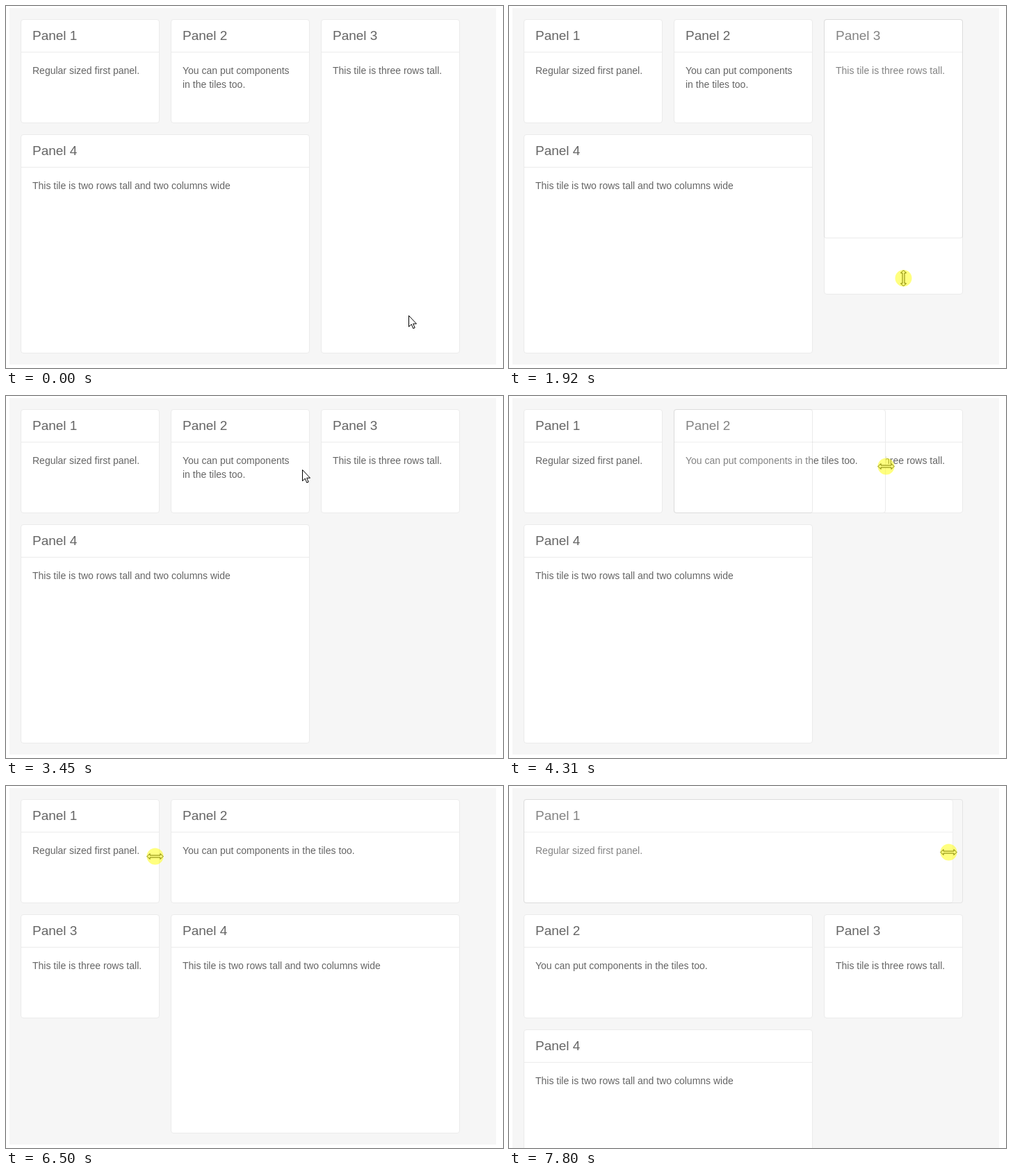
These frames come from a looping animation (715x522 px, 8000 ms). An HTML page:

```html
<!DOCTYPE html>
<html lang="en">
<head>
<meta charset="utf-8">
<title>Resizable tiles</title>
<style>
  html, body { margin: 0; width: 100%; height: 100%; overflow: hidden; background: #fff; }
  body { position: relative; font: 14px/20px "Liberation Sans", Arial, sans-serif; color: #656565; }
  * { box-sizing: border-box; }
  #grid {
    position: absolute; left: 5px; top: 3px; width: 700px; padding: 16px; background: #f6f6f6;
    display: grid; grid-template-columns: repeat(3, 200px); grid-auto-rows: 150px; gap: 16px;
  }
  .cell { position: relative; }
  .tile {
    position: absolute; left: 0; top: 0; width: 100%; height: 100%;
    background: #fff; border: 1px solid #ebebeb; border-radius: 4px; overflow: hidden;
  }
  .tile h2 {
    margin: 0; height: 47px; padding: 0 16px; border-bottom: 1px solid #ebebeb;
    font-size: 19px; font-weight: 400; line-height: 46px; white-space: nowrap;
  }
  .tile p { margin: 16px; }
  .drag { z-index: 1; }
  .drag::after {
    content: ""; position: absolute; inset: 0; border-radius: 4px;
    background: rgba(255, 255, 255, .2); border: 1px solid rgba(0, 0, 0, .08);
  }
  svg { position: absolute; left: 0; top: 0; z-index: 2; }
</style>
</head>
<body>
<div id="grid"></div>
<svg width="715" height="522">
  <g id="cursor">
    <path id="shape" fill="#fff" stroke="#000"/>
    <circle id="glow" cx=".5" cy=".5" r="12" fill="#ff0" fill-opacity=".5"/>
  </g>
</svg>
<script>
const LOOP = 8000;
const ARROW = 'M.5 .5V16.5L4.3 13 6.8 19 9.2 18 6.7 12.2H11.5Z';
const RESIZE = 'M-11.5 0L-7.5-4V-1.5H7.5V-4L11.5 0 7.5 4V1.5H-7.5V4Z';
const TEXTS = [
  'Regular sized first panel.',
  'You can put components in the tiles too.',
  'This tile is three rows tall.',
  'This tile is two rows tall and two columns wide'
];

// first change, last change, steps, cursor (capital = pressed), x, y, dragged edge, dragged panel
const MOVES = [
  [0, 0, 1, 'a', 579, 446],
  [150, 610, 7, 'a', 571, 502],
  [920, 920, 1, 'a', 572, 499],
  [1220, 1380, 3, 'v', 568, 497],
  [1610, 1610, 1, 'V', 568, 496, 501],
  [1690, 1920, 4, 'V', 567, 392, 416, 3],
  [1997, 2380, 6, 'V', 567, 156, 183, 3],
  [2450, 2530, 2, 'V', 567, 163, 167, 3],
  [2760, 2760, 1, 'v', 567, 163],
  [3140, 3370, 4, 'a', 418, 103],
  [3450, 3450, 1, 'a', 426, 106],
  [3620, 3770, 3, 'h', 435, 103],
  [4080, 4080, 1, 'H', 435, 103, 437],
  [4156, 4610, 7, 'H', 685, 98, 683, 2],
  [5010, 5010, 1, 'H', 673, 96, 673, 2],
  [5086, 5160, 2, 'H', 660, 97, 661, 2],
  [5330, 5330, 1, 'h', 660, 97],
  [5480, 6022, 8, 'a', 218, 108],
  [6100, 6100, 1, 'h', 214, 101],
  [6500, 6500, 1, 'H', 214, 101, 221],
  [6577, 6960, 6, 'H', 425, 98, 424, 1],
  [7037, 7190, 3, 'H', 447, 97, 446, 1],
  [7420, 7800, 6, 'H', 632, 95, 639, 1]
];

const byId = id => document.getElementById(id);
const cells = TEXTS.map((text, i) => {
  const cell = document.createElement('div');
  cell.innerHTML = `<div class="tile"><h2>Panel ${i + 1}</h2><p>${text}</p></div>`;
  return byId('grid').appendChild(cell);
});

function drawCursor(kind, x, y) {
  const type = kind.toLowerCase();
  byId('cursor').setAttribute('transform', `translate(${x} ${y})`);
  byId('shape').setAttribute('d', type === 'a' ? ARROW : RESIZE);
  byId('shape').setAttribute('transform',
    type === 'a' ? '' : `translate(.5 .5) rotate(${type === 'v' ? 90 : 0})`);
  byId('glow').style.display = kind === type ? 'none' : '';
}

function render(time) {
  const cols = [1, 1, 1, 2], rows = [1, 1, 3, 2];
  let x = 579, y = 446, edge = 0, kind, panel, size;

  for (const [from, to, steps, type, toX, toY, toEdge = 0, target = 0] of MOVES) {
    if (time < from) break;
    const gap = steps > 1 ? (to - from) / (steps - 1) : 1;
    const part = Math.min(1, (Math.floor((time - from) / gap + .01) + 1) / steps);
    const mix = (a, b) => Math.round(a + (b - a) * part);
    x = mix(x, toX);
    y = mix(y, toY);
    edge = mix(edge, toEdge);
    kind = type;
    panel = target;
    if (panel === 3) {
      size = edge - 19;
      rows[2] = Math.max(1, Math.round((size + 16) / 166));
    } else if (panel) {
      size = edge - (panel === 1 ? 21 : 237);
      cols[panel - 1] = Math.max(1, Math.round((size + 16) / 216));
    }
  }

  cells.forEach((cell, i) => {
    const dragged = panel === i + 1;
    const tile = cell.firstChild.style;
    cell.className = dragged ? 'cell drag' : 'cell';
    cell.style.gridArea = `auto / auto / span ${rows[i]} / span ${cols[i]}`;
    tile.width = dragged && i !== 2 ? size + 'px' : '';
    tile.height = dragged && i === 2 ? size + 'px' : '';
  });
  drawCursor(kind, x, y);
}

const start = performance.now();
function tick() {
  render((performance.now() - start) % LOOP);
  requestAnimationFrame(tick);
}
tick();
</script>
</body>
</html>
```
